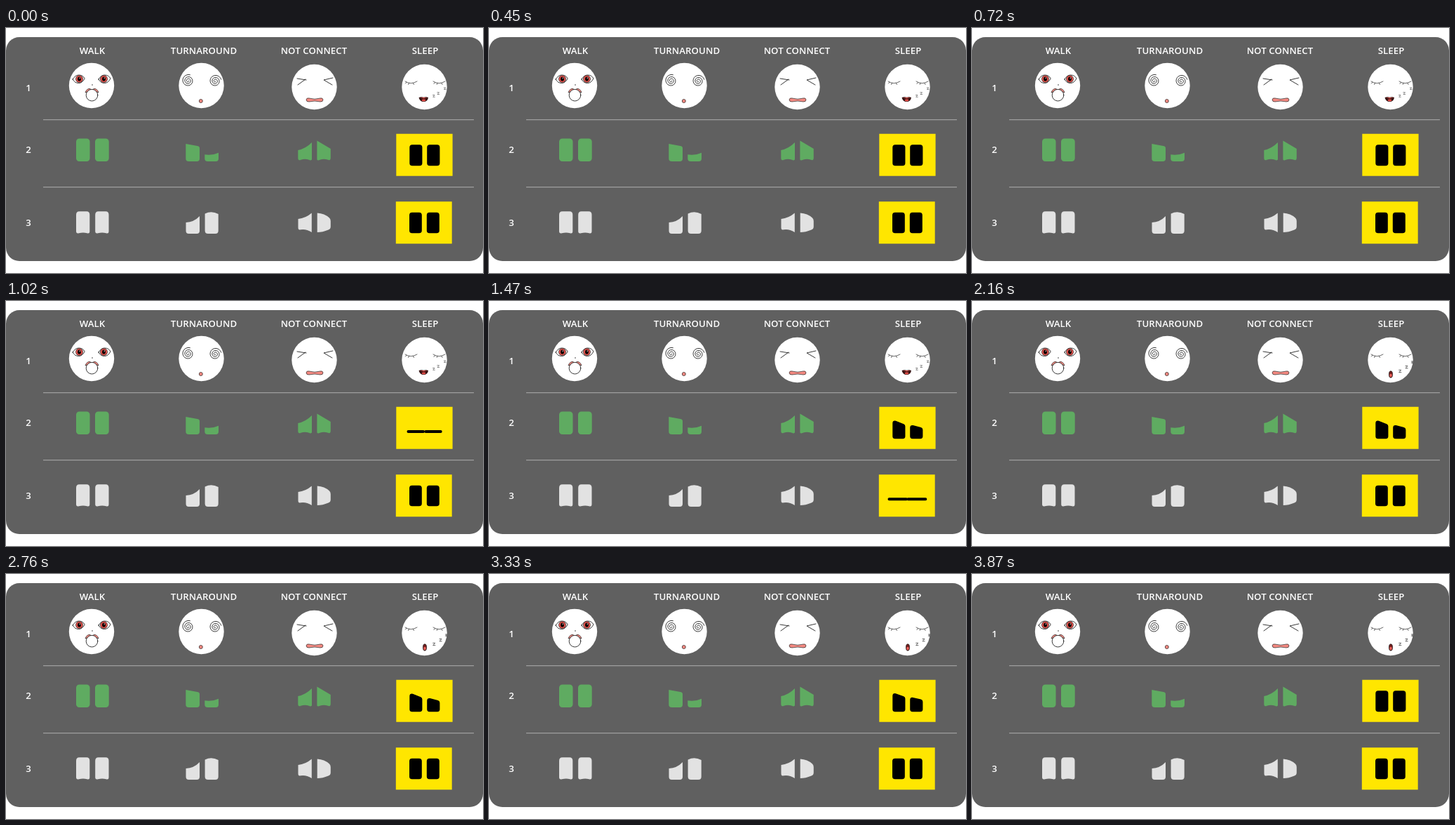
Recreate the animation shown at these times as an HTML page. Size 680x349 px, loop 3.9 s.

```html
<!DOCTYPE html>
<html lang="en">
<head>
<meta charset="utf-8">
<title>Eye expressions</title>
<style>
html, body { margin: 0; width: 100%; height: 100%; overflow: hidden; background: #fff; }
svg { display: block; }
text { font: 600 13.2px "Open Sans", sans-serif; fill: #fff; text-anchor: middle; letter-spacing: .1px; }
.ink { fill: none; stroke: #222; stroke-width: .9; stroke-linecap: round; stroke-linejoin: round; }
.lip { fill: #f58a82; stroke: #222; stroke-width: .7; stroke-linejoin: round; }
.lash { fill: none; stroke: #333; stroke-width: .75; stroke-linecap: round; }
.blink { fill: #000; stroke: #000; stroke-linejoin: round; }
</style>
</head>
<body>
<svg width="680" height="349" viewBox="0 0 680 349">
  <rect y="13" width="680" height="319" rx="19" fill="#606060"/>
  <path d="M53 130.7H667M53 226.7H667" stroke="#adadad"/>
  <text x="123" y="37">WALK</text>
  <text x="282" y="37">TURNAROUND</text>
  <text x="439" y="37">NOT CONNECT</text>
  <text x="597.5" y="37">SLEEP</text>
  <text x="32" y="90">1</text>
  <text x="32" y="178">2</text>
  <text x="32" y="282">3</text>

  <g fill="#fff">
    <circle cx="122" cy="82" r="32.2"/>
    <circle cx="278.5" cy="82" r="32.2"/>
    <circle cx="439.5" cy="84" r="32.2"/>
    <circle cx="596.5" cy="84" r="32.2"/>
  </g>

  <!-- walk -->
  <g id="stare"></g>
  <circle cx="123" cy="81" r=".8" fill="#333"/>
  <path class="lip" d="M113 92Q114.500 87 119 86.300L122.500 88L126 86.300Q130.500 87 132 92L128 90.500H117Z"/>
  <circle class="ink" cx="122.500" cy="95.700" r="8.300" style="fill:#fff"/>

  <!-- turnaround -->
  <path id="spirals" class="ink"/>
  <circle class="lip" cx="277.800" cy="104" r="2.500"/>

  <!-- not connect -->
  <path class="ink" d="M415 72L428 74M416 81L427 73M466 71L453 74L465 81"/>
  <path class="lip" d="M428 102Q428.500 99.300 432 100Q440 102.500 448 100Q451.500 99.300 452 102Q452 105.300 448 105Q440 103 432 105Q428 105.300 428 102Z"/>

  <!-- sleep -->
  <path class="lash" d="M569 76Q577 81.500 586 76M609 76Q617 81.500 626 76M571 77.200L569.500 79M574.500 78.500L573.500 80.500M580.500 78.500L581.500 80.500M611.500 77.500L610 79.500M615 78.500L614.300 80.500M621 78.500L622 80.500"/>
  <g id="smile">
    <path d="M588.500 99Q592 97.500 595.500 98.800Q599 97.500 602 99Q601 105 595.300 105Q590 105 588.500 99Z" fill="#351313"/>
    <path d="M590.500 99.500Q595.500 98.300 600.500 99.500L595.500 100.600Z" fill="#d94c45"/>
    <ellipse cx="595.500" cy="103" rx="2.800" ry="1.400" fill="#e24d48"/>
    <path class="lash" d="M608.500 95.500H611L608.700 98.300H611.300M614.800 91.700H617.500L615 94.500H617.700M624.300 85H626.800L624.500 87.500H627" stroke-opacity=".75"/>
  </g>
  <g id="snore">
    <ellipse cx="597" cy="104.500" rx="2.600" ry="4.700" fill="#701e1e" stroke="#222" stroke-width=".7"/>
    <ellipse cx="597" cy="106" rx="1.700" ry="2.300" fill="#ee625b"/>
    <path class="lash" d="M608.700 98.300H611.700L608.700 101.700H611.900M618 92.500H621L618 95.800H621.200M626.500 86H628.500L626.500 88.300H628.700"/>
  </g>

  <g fill="#5fab61">
    <rect x="100" y="157.500" width="19.500" height="32.500" rx="4.500"/>
    <rect x="127" y="157.500" width="19.700" height="32.500" rx="4.500"/>
    <path d="M256.300 165L274 168.300Q276 168.700 276 171V186Q276 190 272 190H260.500Q256.300 190 256.300 186Z"/>
    <path d="M283.300 180.300Q293.500 182 303 177.700V186Q303 190 299 190H287.500Q283.300 190 283.300 186Z"/>
    <path d="M416.300 174Q427 172 436 163V187.500Q434 189.200 432 187.700Q426 186 420.300 187.700Q416.300 189.500 416.300 185Z"/>
    <path d="M443.400 160.500L462.800 172V185Q462.800 189.300 459 187.700Q453 186 447.500 187.700Q444.500 189.300 443.400 187.500Z"/>
  </g>
  <g fill="#e2e2e2">
    <path id="bar" d="M104.500 261.300H115Q119.300 261.300 119.300 266V290Q119.300 293.300 115.500 292.300Q110 290.700 104 292.300Q100 293.300 100 289.500V266Q100 261.300 104.500 261.300Z"/>
    <use href="#bar" x="27.200"/>
    <path d="M256.500 277Q268 276.500 276 268V289Q276 293 272 293H260.500Q256.500 293 256.500 289Z"/>
    <path d="M283.600 264.500Q293 259.800 302.700 265V288.500Q302.700 293 298.500 293H288Q283.600 293 283.600 288.500Z"/>
    <path d="M416.500 272Q427 271 435.800 263.500V291Q428 286 420 287.300Q416.500 288 416.500 284.500Z"/>
    <path d="M443.700 263.500Q454 264 461 270.500Q462.800 272 462.800 275V283Q462.800 286.500 459.500 287.500Q451 291 443.700 291Z"/>
  </g>

  <path d="M556.300 150.700H636.600V210.700H556.300ZM555.800 247.200H635.700V307.200H555.800Z" fill="#ffe600"/>
  <path id="upper" class="blink"/>
  <path id="lower" class="blink"/>
</svg>
<script>
const $ = id => document.getElementById(id);
const LOOP = 3900;

$('stare').innerHTML = [[103.7, 104.5], [140.5, 139.5]].map(([x, iris]) => `
  <path class="ink" d="M${x - 8.5} 73Q${x - 5} 67 ${x} 67Q${x + 6} 67 ${x + 8.5} 72Q${x + 5} 78.500 ${x} 78.500Q${x - 6} 78.500 ${x - 8.5} 73Z"/>
  <circle cx="${iris}" cy="72.600" r="5" fill="#e5534d" stroke="#222" stroke-width=".7"/>
  <ellipse cx="${iris}" cy="72.600" rx="2.500" ry="3.200" fill="#100"/>
  <circle cx="${iris + .8}" cy="71.200" r=".7" fill="#fff"/>`).join('');

function spiral(cx, cy, turn) {
  let d = '';
  for (let i = 0; i <= 64; i++) {
    const a = turn + i / 64 * Math.PI * 5.6, r = .7 + 8 * Math.sqrt(i / 64) * (.35 + .65 * i / 64);
    d += `${i ? 'L' : 'M'}${(cx + r * Math.cos(a)).toFixed(2)} ${(cy + r * Math.sin(a)).toFixed(2)}`;
  }
  return d;
}
$('spirals').setAttribute('d', spiral(259.700, 75, 0) + spiral(298.300, 75.500, 1));

// A pose lists, for each eye: left, right, top left, top right, bottom; then corner radius
const OPEN2 = [575.3, 593.4, 166.2, 166.2, 196.2, 600.2, 618.4, 166.2, 166.2, 196.2, 3.8];
const SHUT2 = [571.5, 597, 184, 184, 188, 596.5, 621.7, 184, 184, 188, 1.9];
const HALF2 = [575.3, 593.4, 170.5, 175, 196.2, 600.2, 618.4, 177, 180, 196.2, 3.4];
const OPEN3 = [575, 592.8, 262.8, 262.8, 292.2, 599.8, 617.8, 262.8, 262.8, 292.2, 3.8];
const SHUT3 = [568.5, 597, 280.2, 280.2, 284.2, 595.5, 624.3, 280.2, 280.2, 284.2, 1.9];

const UPPER = [[0, OPEN2], [870, OPEN2], [990, SHUT2], [1080, SHUT2], [1230, HALF2], [3300, HALF2], [3450, OPEN2], [LOOP, OPEN2]];
const LOWER = [[0, OPEN3], [1320, OPEN3], [1440, SHUT3], [1530, SHUT3], [1680, OPEN3], [LOOP, OPEN3]];

function poseAt(keys, t) {
  const i = keys.findIndex(k => k[0] > t);
  const [t0, a] = keys[i - 1], [t1, b] = keys[i];
  const p = (t - t0) / (t1 - t0), e = p * p * (3 - 2 * p);
  return a.map((v, n) => v + (b[n] - v) * e);
}

function drawEyes(el, pose) {
  const r = pose[10];
  const eye = ([l, rt, tl, tr, b]) =>
    `M${l + r} ${tl + r}L${rt - r} ${tr + r}V${b - r}H${l + r}Z`;
  el.setAttribute('d', eye(pose.slice(0, 5)) + eye(pose.slice(5, 10)));
  el.setAttribute('stroke-width', 2 * r);
}

function frame(now) {
  const t = now % LOOP, snoring = t >= 1800;
  drawEyes($('upper'), poseAt(UPPER, t));
  drawEyes($('lower'), poseAt(LOWER, t));
  $('smile').style.display = snoring ? 'none' : '';
  $('snore').style.display = snoring ? '' : 'none';
  requestAnimationFrame(frame);
}
frame(0);
</script>
</body>
</html>
```
